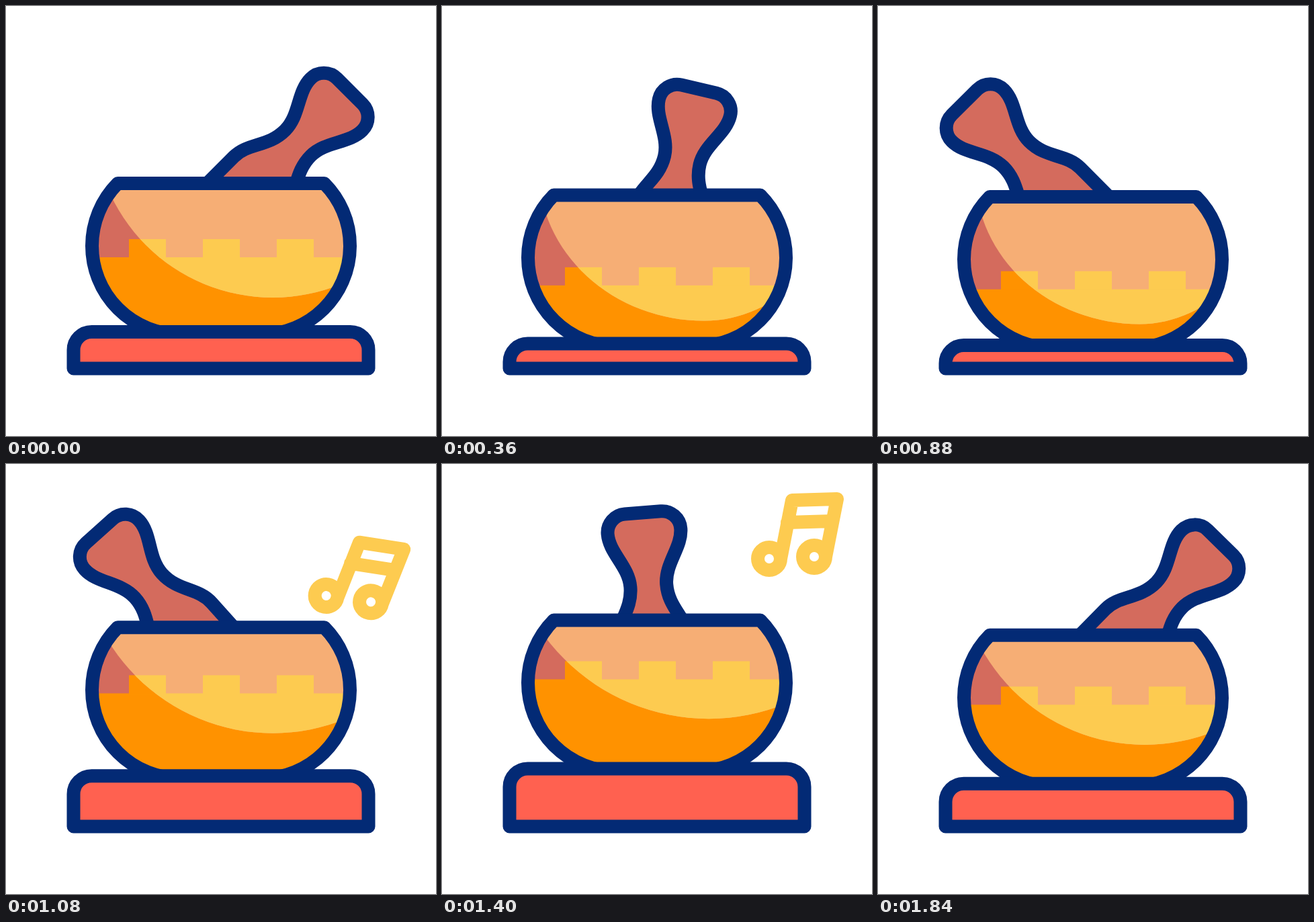
Write an HTML page with a canvas that moves like this. It is 640 px wide and 640 px high and loops after 1880 ms.

```html
<!DOCTYPE html>
<html lang="en">
<head>
<meta charset="utf-8">
<title>Mortar and pestle</title>
<style>
html, body { margin: 0; height: 100%; overflow: hidden; background: #fff; }
canvas { display: block; width: 640px; height: 640px; }
</style>
</head>
<body>
<canvas id="stage" width="640" height="640"></canvas>
<script>
const ctx = document.getElementById('stage').getContext('2d');
const LOOP = 1880, STEP = 40;
const NAVY = '#032a75', CLAY = '#d46b5d', PEACH = '#f6ae75', YELLOW = '#fdcb50',
      ORANGE = '#ff9200', RED = '#ff6150';

const clamp = x => Math.max(0, Math.min(1, x));
const mix = (a, b, k) => a + (b - a) * k;
const easeOut = (x, p) => 1 - (1 - clamp(x)) ** p;
const smooth = x => (x = clamp(x), x * x * (3 - 2 * x));

function layer(draw) {
  ctx.save();
  draw();
  ctx.restore();
}

function paint(path, fill) {
  ctx.fillStyle = fill;
  ctx.fill(path);
  ctx.strokeStyle = NAVY;
  ctx.stroke(path);
}

// Squash value: 0 at rest, low while pressed, high after the bounce
function bounce(t, low, high) {
  if (t < 880) return low * easeOut(t / 880, 4);
  if (t < 1400) return mix(low, high, easeOut((t - 880) / 520, 3.25));
  return high * (1 - ((t - 1400) / 480) ** 4);
}

// Pestle angle in degrees, swinging right to left and back
const swing = t => 45 - 90 * smooth(t / 900) + 90 * smooth((t - 980) / 900);

const pestle = new Path2D(`M-53 0V-80C-53-110-27-126-27-162C-27-193-54.5-215-54.5-243
  A27.7 27.7 0 0 1-26.8-271H26.8A27.7 27.7 0 0 1 54.5-243
  C54.5-215 27-193 27-162C27-126 53-110 53-80V0Z`);

const bowl = new Path2D();
const lip = Math.asin(93 / 132);
bowl.moveTo(168, 264);
bowl.lineTo(472, 264);
bowl.arc(380, 357, 132, -lip, Math.PI / 2);
bowl.arc(260, 357, 132, Math.PI / 2, Math.PI + lip);
bowl.closePath();

const note = new Path2D('M-25 36L-8-51L59-53L42 33M-15-18L52-20');
for (const [x, y] of [[-42, 36], [25, 33]]) {
  note.moveTo(x + 17, y);
  note.arc(x, y, 17, 0, 7);
}

function drawPestle(angle) {
  const rad = angle * Math.PI / 180;
  ctx.beginPath();
  ctx.rect(0, -100, 640, 364);
  ctx.clip();
  ctx.translate(320, 182 + 193 * Math.cos(rad) + 0.08 * Math.min(0, angle));
  ctx.rotate(rad);
  paint(pestle, CLAY);
}

function drawBands(top, upper, lower) {
  ctx.fillStyle = upper;
  ctx.fillRect(100, 250, 440, 300);
  ctx.fillStyle = lower;
  ctx.fillRect(100, top + 27, 440, 300);
  for (const x of [183, 293, 403]) ctx.fillRect(x, top, 55, 28);
}

// Lit part of the bowl, bounded below by a curve that bends with the liquid
function clipLight(shift) {
  const down = 0.7 * Math.max(0, shift), up = 1.06 * Math.max(0, -shift);
  const rx = 267 - 1.2 * down + 1.6 * up, ry = rx - 1.2 * down;
  const cx = 397 - 0.4 * down, cy = 434 + down - up - ry;
  ctx.beginPath();
  ctx.ellipse(cx, cy, rx - 2.4 * down, ry, 0, 0, Math.PI / 2);
  ctx.ellipse(cx, cy, rx, ry, 0, Math.PI / 2, Math.PI);
  ctx.closePath();
  ctx.clip();
}

function drawBowl(shift) {
  const top = 347 + shift;
  layer(() => {
    ctx.clip(bowl);
    drawBands(top, CLAY, ORANGE);
    clipLight(shift);
    drawBands(top, PEACH, YELLOW);
  });
  ctx.strokeStyle = NAVY;
  ctx.stroke(bowl);
}

function drawBase(dy) {
  paint(new Path2D(`M100.5 539.5V${512 + dy}a27 27 0 0 1 27-27H512.5a27 27 0 0 1 27 27V539.5Z`), RED);
}

function drawNote(t) {
  const k = (t - 1080) / 320;
  ctx.globalAlpha = clamp((t - 880) / 80) * clamp((1680 - t) / 160);
  ctx.translate(mix(524.5, 529, k), mix(168.3, 105, k));
  ctx.rotate(mix(10.5, 0, k) * Math.PI / 180);
  ctx.strokeStyle = YELLOW;
  ctx.stroke(note);
}

function frame(now) {
  const t = Math.floor(now % LOOP / STEP) * STEP;
  const dy = bounce(t, 20, -31.5);
  const shift = bounce(t, 27.7, -22);
  ctx.fillStyle = '#fff';
  ctx.fillRect(0, 0, 640, 640);
  ctx.lineWidth = 20;
  ctx.lineJoin = ctx.lineCap = 'round';
  layer(() => {
    ctx.translate(0, dy);
    layer(() => drawPestle(swing(t)));
    drawBowl(shift);
  });
  drawBase(dy);
  if (t > 880 && t < 1680) layer(() => drawNote(t));
}

const start = performance.now();
function tick() {
  frame(performance.now() - start);
  requestAnimationFrame(tick);
}
tick();
</script>
</body>
</html>
```
